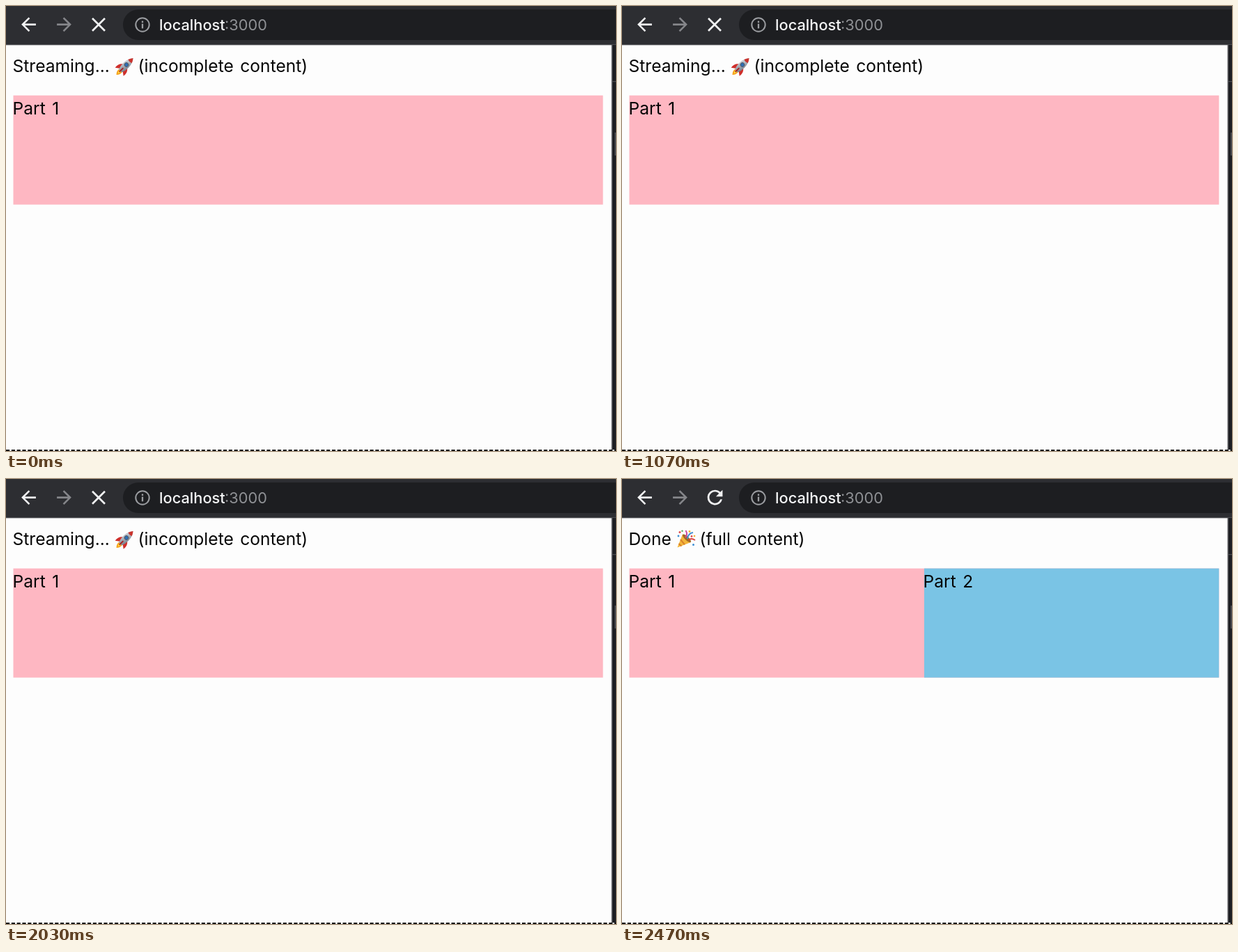
An HTML page for the animation above (2.93 s loop, 876 by 640 pixels).

```html
<!DOCTYPE html>
<html lang="en">
<head>
<meta charset="utf-8">
<title>Streaming page</title>
<style>
  html, body { margin: 0; width: 100%; height: 100%; overflow: hidden; background: #fdfdfd; }
  svg { display: block; width: 876px; height: 640px; }
  text { font-family: Inter, "Open Sans", sans-serif; white-space: pre; }
  .page text { font-size: 24.6px; word-spacing: 2.6px; fill: #050505; }
  .bar text { font-size: 21.8px; }
</style>
</head>
<body>
<svg viewBox="0 0 876 640">
  <defs>
    <path id="arrow" d="M20 11H7.83l5.59-5.59L12 4l-8 8 8 8 1.41-1.41L7.83 13H20z"/>
    <linearGradient id="hull" x1="0" y1="0" x2="1" y2="1">
      <stop offset="0" stop-color="#e3e7ec"/>
      <stop offset="1" stop-color="#6d7683"/>
    </linearGradient>
  </defs>
  <rect width="876" height="640" fill="#fdfdfd"/>

  <g class="bar">
    <rect width="876" height="56" fill="#2d2e32"/>
    <rect y="55" width="876" height="1.3" fill="#4b4c50"/>
    <rect x="168" y="5" width="760" height="44" rx="22" fill="#1d1e21"/>
    <use href="#arrow" transform="translate(16.9 11) scale(1.3)" fill="#f1f2f3"/>
    <use href="#arrow" transform="translate(99.1 11) scale(-1.3 1.3)" fill="#85868a"/>
    <path id="stop" d="M124 17.7l18 18M142 17.7l-18 18" stroke="#f1f2f3" stroke-width="2.7"/>
    <path id="reload" transform="translate(117.2 10.2) scale(1.36)" fill="#f1f2f3"
      d="M17.65 6.35A7.96 7.96 0 0 0 12 4a8 8 0 1 0 7.73 10h-2.08A6 6 0 1 1 12 6c1.66 0 3.14.69 4.22 1.78L13 11h7V4z"/>
    <circle cx="196" cy="27" r="9.7" fill="none" stroke="#9b9da1" stroke-width="2"/>
    <path d="M196 25.4v6.8M196 21.4v2.5" stroke="#9b9da1" stroke-width="2.3"/>
    <text x="220" y="34.7" font-weight="500" fill="#f4f5f6">localhost<tspan x="314" font-weight="400" fill="#8f9195">:3000</tspan></text>
  </g>

  <g class="page">
    <rect x="10.5" y="128.6" width="846.8" height="157" fill="#feb7c2"/>
    <g id="loading">
      <text x="9.5" y="95.4">Streaming...</text>
      <text x="189.5" y="95.4">(incomplete content)</text>
      <g transform="translate(170.5 87) rotate(45)">
        <path d="M-3 8Q-4 13 0 17Q4 13 3 8z" fill="#f6a11c"/>
        <path d="M-1.5 8Q-2 11 0 14Q2 11 1.5 8z" fill="#ffe14a"/>
        <path d="M-4-1Q-10 3-8.5 11L-3 7zM4-1Q10 3 8.5 11L3 7z" fill="#cf2f2b"/>
        <path d="M0-17Q-5-11-5-3Q-5 4-3 9H3Q5 4 5-3Q5-11 0-17z" fill="url(#hull)"/>
        <path d="M0-17Q-2.6-14-3.7-10.5Q0-9 3.7-10.5Q2.6-14 0-17z" fill="#c9332d"/>
        <circle cy="-3.5" r="2.8" fill="#2d6fb5" stroke="#525a66"/>
        <path d="M-1 3H1V11H-1z" fill="#a92424"/>
      </g>
    </g>
    <g id="done">
      <rect x="434" y="128.6" width="423.3" height="157" fill="#7ac4e5"/>
      <text x="432.5" y="155.7">Part 2</text>
      <text x="9.5" y="95.4">Done</text>
      <text x="111.5" y="95.4">(full content)</text>
      <path d="M79.5 98.5L87 79.5Q95 83 98.8 91z" fill="#f3b63b"/>
      <path d="M84 87L90 94.4M81.5 93L85.5 96.4" stroke="#d9822b" stroke-width="2"/>
      <ellipse cx="93" cy="85.3" rx="2.7" ry="8" transform="rotate(-46 93 85.3)" fill="#a06a25"/>
      <g fill="none" stroke-width="1.9">
        <path d="M91 84Q95 80 91.5 74" stroke="#cc4a9c"/>
        <path d="M94 86Q95 78 102 77" stroke="#3f8fd2"/>
        <path d="M96 88Q99 84 105 88" stroke="#d94343"/>
      </g>
      <g fill="#e14c4c"><circle cx="83" cy="76.5" r="1.5"/><circle cx="100" cy="82.5" r="1.4"/></g>
      <g fill="#3f8fd2"><circle cx="81" cy="82" r="1.4"/><circle cx="102.5" cy="94.5" r="1.5"/></g>
      <g fill="#efb532"><circle cx="97" cy="75.5" r="1.4"/><circle cx="104" cy="82" r="1.3"/></g>
      <circle cx="86.5" cy="74.8" r="1.2" fill="#57a95b"/>
    </g>
    <text x="9.5" y="155.7">Part 1</text>
    <path d="M0 639H876" stroke="#111" stroke-width="1.8" stroke-dasharray="5.2 2.6"/>
  </g>

  <g>
    <rect x="870" y="56" width="6" height="582" fill="#1d1e22"/>
    <rect x="869.5" y="56" width="1.5" height="582" fill="#58595d"/>
    <rect x="871" y="108" width="5" height="1.2" fill="#4b4c50"/>
    <rect x="874" y="182" width="2" height="33" fill="#47484c"/>
  </g>
</svg>
<script>
  const LOOP = 2930, CONTENT_AT = 2070, LOADED_AT = 2130;
  const show = (id, on) => {
    document.getElementById(id).style.display = on ? "" : "none";
  };

  function draw(now) {
    const t = now % LOOP;
    show("loading", t < CONTENT_AT);
    show("done", t >= CONTENT_AT);
    show("stop", t < LOADED_AT);
    show("reload", t >= LOADED_AT);
  }

  const start = performance.now();
  function tick() {
    draw(performance.now() - start);
    requestAnimationFrame(tick);
  }
  tick();
</script>
</body>
</html>
```
